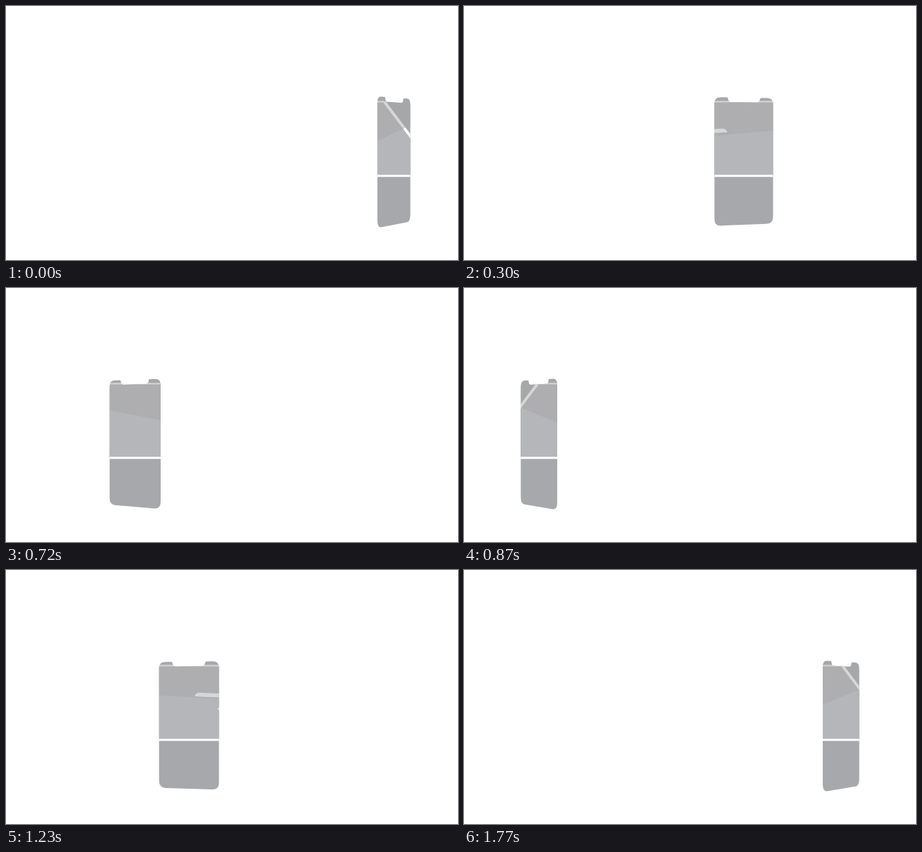
Write an HTML page with a canvas that moves like this. It is 640 by 360 pixels and loops after 1.8 s.

```html
<!DOCTYPE html>
<html lang="en">
<head>
<meta charset="utf-8">
<title>Sliding glass</title>
<style>
  html, body { margin: 0; width: 100%; height: 100%; overflow: hidden; background: #fff; }
  canvas { display: block; width: 640px; height: 360px; }
</style>
</head>
<body>
<canvas id="stage"></canvas>
<script>
const LOOP = 1800, STEP = 30, HALF_STEPS = 30;
const EYE = 1080, HORIZON = 180, HALF_W = 44;
const MAX_TURN = 58 * Math.PI / 180;

const canvas = document.getElementById('stage');
const ctx = canvas.getContext('2d');
const ratio = window.devicePixelRatio || 1;
canvas.width = 640 * ratio;
canvas.height = 360 * ratio;
ctx.scale(ratio, ratio);

function line(points, width, color) {
  ctx.beginPath();
  points.forEach(([x, y]) => ctx.lineTo(x, y));
  ctx.lineWidth = width;
  ctx.strokeStyle = color;
  ctx.stroke();
}

function fill(points, color) {
  ctx.beginPath();
  points.forEach(([x, y]) => ctx.lineTo(x, y));
  ctx.fillStyle = color;
  ctx.fill();
}

// Panel outline with a notch; u is measured from its middle.
function outline(project) {
  const move = (u, v) => ctx.moveTo(...project(u, v));
  const to = (u, v) => ctx.lineTo(...project(u, v));
  const bend = (cu, cv, u, v) => ctx.quadraticCurveTo(...project(cu, cv), ...project(u, v));
  const top = 130, bottom = 310, w = HALF_W;
  ctx.beginPath();
  move(-w, top + 9);
  bend(-w, top, -w + 9, top);
  to(-26, top);
  bend(-24, top, -24, top + 2);
  bend(-23.5, top + 6.5, -19, top + 6.5);
  to(19, top + 6.5);
  bend(23.5, top + 6.5, 24, top + 2);
  bend(24, top, 26, top);
  to(w - 9, top);
  bend(w, top, w, top + 9);
  to(w, bottom - 10);
  bend(w, bottom, w - 10, bottom);
  to(-w + 10, bottom);
  bend(-w, bottom, -w, bottom - 10);
  ctx.closePath();
}

// Fixed scenery, seen only through the panel.
function scenery() {
  ctx.fillStyle = '#a7a8ab';
  ctx.fillRect(0, 0, 640, 360);
  fill([[104, 135.5], [536, 135.5], [615, 241], [25, 241]], '#b5b6ba');
  line([[104, 135.6], [536, 135.6]], 2, '#fff');
  line([[536, 136], [615, 241]], 3.8, '#fff');
  line([[104, 136], [25, 241]], 3.8, '#fff');
  line([[0, 240.8], [640, 240.8]], 3, '#fff');

  ctx.fillStyle = '#fff';
  ctx.beginPath();
  ctx.moveTo(267, 179);
  ctx.quadraticCurveTo(269, 174, 273, 173.8);
  ctx.quadraticCurveTo(320, 176.5, 367, 173.8);
  ctx.quadraticCurveTo(371, 174, 373, 179);
  ctx.quadraticCurveTo(320, 182.5, 267, 179);
  ctx.fill();
  for (const x of [302, 338]) {
    ctx.beginPath();
    ctx.arc(x, 196.7, 1.8, 0, 2 * Math.PI);
    ctx.fill();
  }
}

function draw(time) {
  const step = Math.floor((time % LOOP) / STEP);
  const swing = 1 - 2 * Math.abs((step + HALF_STEPS) % (2 * HALF_STEPS) - HALF_STEPS) / HALF_STEPS;
  const side = -swing;                       // 1 at the right end, -1 at the left
  const pos = 320 - 230 * swing * -1;
  render(pos, MAX_TURN * -side);
}

function render(cx, turn) {
  const sin = Math.sin(turn), cos = Math.cos(turn);
  const project = (u, v) => {
    const p = EYE / (EYE + u * sin);
    return [cx + u * cos * p, HORIZON + (v - HORIZON) * p];
  };

  ctx.clearRect(0, 0, 640, 360);
  ctx.save();
  outline(project);
  ctx.clip();
  scenery();

  // Tinted upper part, tilting as the panel turns.
  const tilt = 13.5 * Math.sign(sin) * Math.abs(sin) ** 1.2;
  const [left] = project(-HALF_W, 0), [right] = project(HALF_W, 0);
  fill([[left, 100], [right, 100], [right, 180.3 - tilt], [left, 180.3 + tilt]],
    'rgba(164, 164, 164, 0.45)');
  ctx.restore();
}

const start = performance.now();
function tick() {
  draw(performance.now() - start);
  requestAnimationFrame(tick);
}
tick();
</script>
</body>
</html>
```
